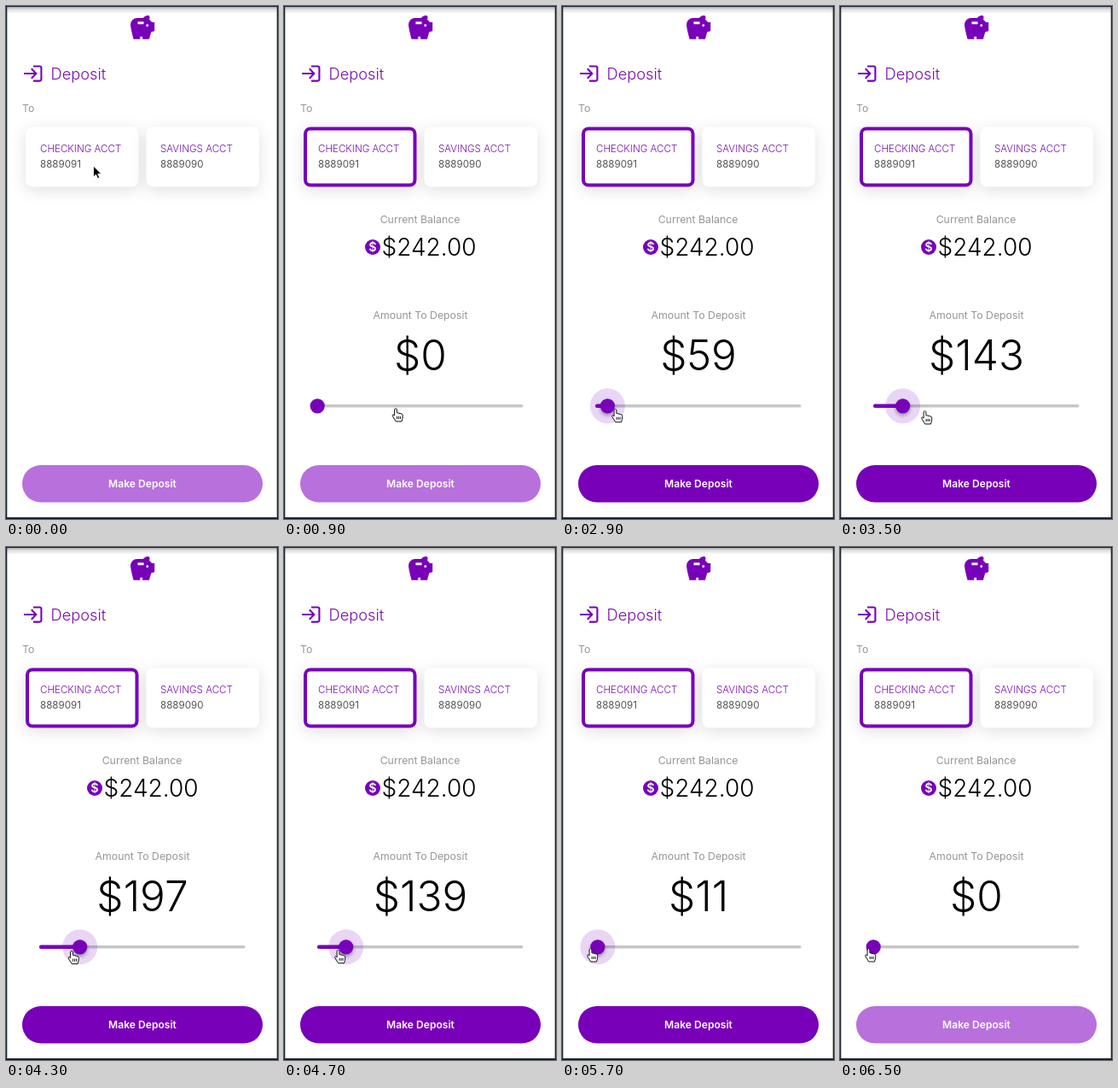
Write an HTML page that moves like this. It is 319 px wide and 600 px high and loops after 6.6 s.

```html
<!DOCTYPE html>
<html lang="en">
<head>
<meta charset="utf-8">
<title>Deposit</title>
<style>
  html, body { margin: 0; width: 100%; height: 100%; overflow: hidden; background: #fff; }
  svg { display: block; width: 319px; height: 600px; font-family: Inter, "Open Sans", sans-serif; font-weight: 300; }
  .purple { fill: #7800b9; }
  .white { fill: #fff; }
  .label { fill: #969696; font-size: 12.3px; font-weight: 400; }
  .name { fill: #7a0fb0; font-size: 11.6px; }
  .number { fill: #555; font-size: 11.6px; font-weight: 400; }
  .money { font-weight: 350; }
  .bold { font-weight: 600; }
  .mid { text-anchor: middle; }
  .card { fill: #fff; filter: drop-shadow(0 4px 9px rgba(0, 0, 0, .12)); }
  .line { fill: none; stroke: #7800b9; }
  .blur { filter: blur(2px); }
  #arrow { stroke: #fff; stroke-width: .9; }
  #hand { fill: #fff; stroke: #111; stroke-linejoin: round; }
</style>
</head>
<body>
<svg viewBox="0 0 319 600">
  <defs>
    <linearGradient id="shade" x2="0" y2="1">
      <stop stop-color="#8d8f94"/>
      <stop offset=".4" stop-color="#dcdcde"/>
      <stop offset="1" stop-color="#fff"/>
    </linearGradient>
  </defs>
  <rect width="319" height="9" fill="url(#shade)"/>

  <g transform="translate(143.2 8.2) scale(1.41 1.45)">
    <path class="purple" d="M7.5 4h5Q14 2 16.5 2A1.5 1.5 0 0 1 17.9 4L17.6 5.2 19.8 7.5H22v7l-2.8.9L17.5 21H12v-2h-2v2H4.5Q2 12 2 9.5A5.5 5.5 0 0 1 7.5 4z"/>
    <rect class="white" x="8" y="7" width="5" height="2"/>
    <circle class="white" cx="16" cy="10" r="1"/>
  </g>
  <path class="line" stroke-width="2.1" d="M21 79H34.5M29.8 73.2 35.3 79 29.8 84.8M32 70.5H39.5Q41.4 70.5 41.4 72.5V85.6Q41.4 87.6 39.5 87.6H32"/>
  <text x="52.5" y="85.5" fill="#7a0fb0" font-size="18.3">Deposit</text>
  <text x="19" y="124" class="label">To</text>

  <rect class="card" x="23" y="141.5" width="132.5" height="70" rx="8"/>
  <rect class="card" x="164.5" y="141.5" width="132.5" height="70" rx="8"/>
  <text x="40" y="171.3" class="name">CHECKING ACCT</text>
  <text x="40" y="189" class="number">8889091</text>
  <text x="181" y="171.3" class="name">SAVINGS ACCT</text>
  <text x="181" y="189" class="number">8889090</text>

  <g id="details">
    <rect class="line" x="25" y="143.5" width="128.5" height="66" rx="6" stroke-width="4"/>
    <text x="159.5" y="254" class="label mid">Current Balance</text>
    <circle class="purple" cx="104" cy="282" r="9"/>
    <text x="104" y="287.2" class="white bold mid" font-size="14.5">$</text>
    <text x="170" y="291.8" class="money mid" font-size="28">$242.00</text>
    <text x="160" y="366" class="label mid">Amount To Deposit</text>
    <text id="amount" x="160" y="426.4" class="money mid" font-size="49.5"></text>
    <rect x="39" y="466" width="241.5" height="3.6" rx="1.8" fill="#c6c6c6"/>
    <rect id="fill" class="purple" x="39" y="465.6" height="4.4" rx="2"/>
    <g id="press">
      <circle class="purple" cy="467.8" r="20.5" opacity=".16"/>
      <circle class="blur" cy="470.5" r="8.5" opacity=".35"/>
    </g>
    <circle id="thumb" class="purple" cy="467.8" r="8.6"/>
  </g>

  <rect id="button" x="19" y="537" width="282" height="43.5" rx="21.7"/>
  <text x="160" y="563" class="white bold mid" font-size="12.1">Make Deposit</text>

  <path d="M0 0H319V600H0zM1.3 1V598H317.7V1z" fill="#1b2433" fill-rule="evenodd"/>

  <path id="arrow" d="M0 0V13l3-2.8 2.1 4.6 2.2-1-2.1-4.4H9.4z"/>
  <path id="hand" d="M-1.4 1.2Q0-.9 1.4 1.2V5.2L6 6.3Q8.3 6.5 8.3 8.5 8.3 12.5 7 15.5H.2L-3.6 9.3Q-4.4 7.6-2.9 7.4L-1.4 8.6zM1.6 9.5v3m2-3v3m2-3v3"/>
</svg>

<script>
const LOOP = 6600, STEP = 100, TRACK = 241, MAX = 1000;
const el = Object.fromEntries([...document.querySelectorAll('[id]')].map(e => [e.id, e]));

// Key points: [time, value]
const pointerX = [
  [200, 102.5], [900, 131], [2000, 42], [2300, 42], [2900, 62.5],
  [3500, 99.5], [3750, 117], [4300, 77], [5100, 50], [5700, 33.5]
];
const deposit = [[2300, 0], [2900, 59], [3500, 143], [3850, 290], [4300, 197], [5100, 80], [5800, 0]];

const ramp = (t, from, to) => Math.min(1, Math.max(0, (t - from) / (to - from)));

// Sum of the clamped moves between neighbouring key points
const at = (keys, t) => keys.slice(1).reduce(
  (sum, [time, v], i) => sum + (v - keys[i][1]) * ramp(t, keys[i][0], time), keys[0][1]);

function set(id, attrs) {
  for (const key in attrs) el[id].setAttribute(key, attrs[key]);
}

function draw(t) {
  const x = at(pointerX, t);
  const y = 187 + 283 * ramp(t, 200, 800) + (x - 42) * .06 * ramp(t, 800, 2000);
  const value = Math.round(at(deposit, t));
  const thumbX = 39.2 + value / MAX * TRACK;
  const active = ramp(t, 2300, 2700) - ramp(t, 5700, 6100);
  const mix = (light, dark) => Math.round(light + (dark - light) * active);
  const onSlider = t >= 800;

  set('details', { visibility: t < 100 ? 'hidden' : 'visible' });
  el.amount.textContent = '$' + value;
  set('fill', { width: thumbX - 39 });
  set('thumb', { cx: thumbX });
  set('press', {
    transform: `translate(${thumbX} 0)`,
    opacity: ramp(t, 2200, 2400) - ramp(t, 6200, 6500)
  });
  set('button', { fill: `rgb(${mix(184, 120)},${mix(112, 0)},${mix(220, 185)})` });
  set('arrow', { transform: `translate(${x} ${y})`, display: onSlider ? 'none' : 'inline' });
  set('hand', { transform: `translate(${x} ${y})`, display: onSlider ? 'inline' : 'none' });
}

const start = performance.now();
function tick() {
  const t = (performance.now() - start) % LOOP;
  draw(Math.floor(t / STEP) * STEP);
  requestAnimationFrame(tick);
}
tick();
</script>
</body>
</html>
```
